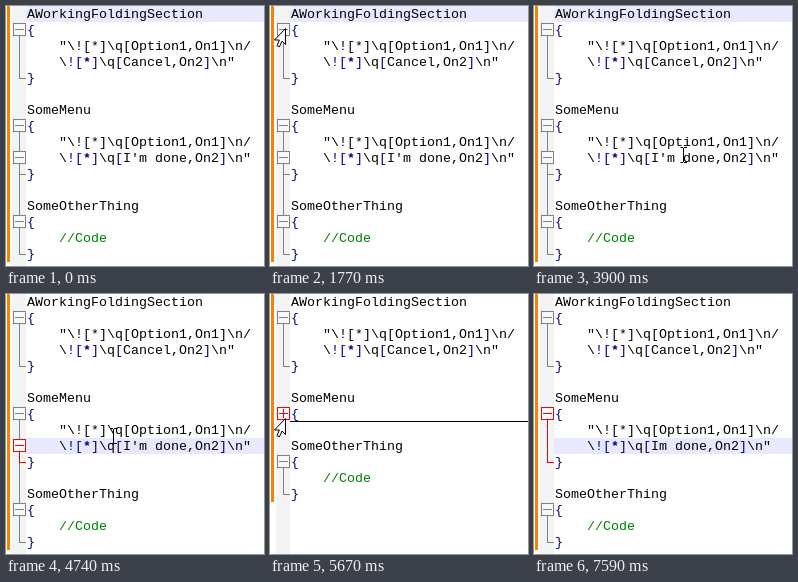
Animation, 258 px wide and 260 px high, one loop 7650 ms. Source, as an HTML page:

```html
<!DOCTYPE html>
<html lang="en">
<head>
<meta charset="utf-8">
<title>Code folding</title>
<style>
  html, body { margin: 0; width: 100%; height: 100%; overflow: hidden; background: #fff; }
  svg { display: block; }
  text { font: 13.333px "Liberation Mono", monospace; white-space: pre; }
  .op { fill: #000080; }
  .star { fill: #000080; font-weight: bold; }
  .note { fill: #008000; }
</style>
</head>
<body>
<svg width="258" height="260" viewBox="0 0 258 260">
  <g id="page"></g>
  <rect id="caret" width="1" height="16" shape-rendering="crispEdges"/>
  <path id="arrow" d="M.5 .5V16.5L-3 13L-5.6 18.8L-8 17.7L-5.6 12H-10.5Z" fill="#fff" stroke="#000"/>
  <path id="beam" d="M-3.5 -7.5H-1M0 -7.5H3M-.5 -7V7M-3.5 7.5H-1M0 7.5H3" fill="none" stroke="#000"/>
</svg>
<script>
const LOOP = 7650, TICK = 30, ROW = 16, TEXT_X = 21, CHAR = 8;
const GRAY = '#808080', RED = '#f00';

const CODE = String.raw`AWorkingFoldingSection
{
    "\![*]\q[Option1,On1]\n/
    \![*]\q[Cancel,On2]\n"
}

SomeMenu
{
    "\![*]\q[Option1,On1]\n/
    \![*]\q[I'm done,On2]\n"
}

SomeOtherThing
{
    //Code
}`.split('\n');

// Every section runs from its "{" row to its "}" row.
const rowsOf = mark => CODE.flatMap((line, row) => line === mark ? [row] : []);
const HEADS = rowsOf('{'), TAILS = rowsOf('}');
const QUOTE_ROW = CODE.findIndex(line => line.includes("'"));
const QUOTE_COLUMN = CODE[QUOTE_ROW].indexOf("'");

const FOCUS = 958, CLICK = 4110, ERASE = 4880, BLINK = 542;
const FOLDS = [
  { from: 930, to: 1770, section: 0 },
  { from: 2730, to: 3420, section: 1 },
  { from: 5610, to: 6420, section: 1 }
];

const ENTRY = { x: 237, y: 39 };
const MOVES = [
  { from: 390, to: 690, x: 15, y: 22 },
  { from: 1890, to: 2310, x: 15, y: 117 },
  { from: 3630, to: 3900, x: 150, y: 149 },
  { from: 3900, to: 4080, x: 133, y: 150 },
  { from: 4560, to: 4740, x: 108, y: 142 },
  { from: 4740, to: 5430, x: 15, y: 124 },
  { from: 7020, to: 7350, x: 262, y: 55 }
];

const $ = id => document.getElementById(id);
const rect = (x, y, w, h, fill) =>
  `<rect x="${x}" y="${y}" width="${w}" height="${h}" fill="${fill}" shape-rendering="crispEdges"/>`;

function foldBox(y, folded, color) {
  return rect(7, y + 1, 13, 13, color) + rect(8, y + 2, 11, 11, '#f8f8f8') +
    rect(9, y + 7, 9, 1, color) + (folded ? rect(13, y + 3, 1, 9, color) : '');
}

function bracket(top, bottom, color) {
  return rect(13, top + 14, 1, bottom - top - 5, color) + rect(13, bottom + 8, 7, 1, color);
}

function codeLine(line, y) {
  const body = /^\s*"/.test(line) ? line : line
    .replace(/[![\]{}]/g, '<tspan class="op">$&</tspan>')
    .replace('*', '<tspan class="star">*</tspan>')
    .replace(/\/\/.*/, '<tspan class="note">$&</tspan>');
  return `<text x="${TEXT_X}" y="${y + 12}" xml:space="preserve">${body}</text>`;
}

// The stray quote opens a block that never closes, so its fold swallows the rest.
function layout({ fold, broken }) {
  const head = fold ? HEADS[fold.section] : Infinity;
  const last = fold && (broken && fold.section ? CODE.length : TAILS[fold.section]);
  const tops = [];
  let bottom = 0;
  CODE.forEach((_, row) => {
    if (row > head && row <= last) return;
    tops[row] = bottom;
    bottom += ROW;
  });
  return { tops, bottom };
}

function margin({ fold, broken, clicked }, tops) {
  const hot = clicked ? (broken ? QUOTE_ROW : HEADS[1]) : -1;
  const shown = row => tops[row] !== undefined;
  const color = row => row === hot ? RED : GRAY;
  let lines = '', boxes = '';
  HEADS.forEach((head, i) => {
    if (!shown(head)) return;
    const folded = !!fold && fold.section === i;
    boxes += foldBox(tops[head], folded, color(head));
    if (!folded) lines += bracket(tops[head], tops[TAILS[i]], color(head));
  });
  if (broken && shown(QUOTE_ROW)) {
    const end = tops[TAILS[1]];
    lines += rect(13, end + 8, 1, tops[HEADS[2]] - end - 7, GRAY);
    lines += bracket(tops[QUOTE_ROW], end, color(QUOTE_ROW));
    boxes += foldBox(tops[QUOTE_ROW], false, color(QUOTE_ROW));
  }
  return lines + boxes;
}

function drawPage(state, { tops, bottom }) {
  const { fold, broken, clicked } = state;
  const current = tops[clicked ? QUOTE_ROW : 0];
  let out = rect(6, 0, 14, 260, '#f4f4f4') + rect(1, 0, 3, bottom, '#ff8000');
  if (current !== undefined) out += rect(20, current, 238, ROW, '#e8e8ff');
  CODE.forEach((line, row) => {
    if (tops[row] !== undefined) out += codeLine(broken ? line : line.replace("'", ''), tops[row]);
  });
  if (fold) out += rect(20, tops[HEADS[fold.section]] + 15, 238, 1, '#000');
  $('page').innerHTML = out + margin(state, tops);
}

// Each focus, click or key press restarts the blinking.
function caretAt(t, { broken, clicked }, tops) {
  const since = [ERASE, CLICK, FOCUS].find(time => t >= time);
  if (!since || Math.floor((t - since) / BLINK) % 2) return null;
  const column = clicked ? QUOTE_COLUMN + (broken ? 1 : 0) : CODE[0].length;
  const y = tops[clicked ? QUOTE_ROW : 0];
  return y === undefined ? null : [TEXT_X - 1 + CHAR * column, y];
}

function pointerAt(t) {
  if (t < MOVES[0].from || t >= MOVES.at(-1).to) return null;
  let { x, y } = ENTRY;
  for (const move of MOVES) {
    const k = Math.min(1, Math.max(0, (t - move.from) / (move.to - move.from)));
    const eased = k * (2 - k);
    x += (move.x - x) * eased;
    y += (move.y - y) * eased;
  }
  return [Math.round(x), Math.round(y)];
}

function show(node, position) {
  node.style.display = position ? '' : 'none';
  if (position) node.setAttribute('transform', `translate(${position})`);
}

let lastKey;
function render(t) {
  const state = {
    fold: FOLDS.find(f => t >= f.from && t < f.to),
    broken: t < ERASE,
    clicked: t >= CLICK
  };
  const view = layout(state);
  const key = JSON.stringify(state);
  if (key !== lastKey) drawPage(state, view);
  lastKey = key;

  show($('caret'), caretAt(t, state, view.tops));
  const pointer = pointerAt(t);
  const inMargin = pointer && pointer[0] < 20;
  show($('arrow'), inMargin ? pointer : null);
  show($('beam'), inMargin ? null : pointer);
}

const start = performance.now();
function tick() {
  const t = (performance.now() - start) % LOOP;
  render(Math.floor(t / TICK) * TICK);
  requestAnimationFrame(tick);
}
tick();
</script>
</body>
</html>
```
